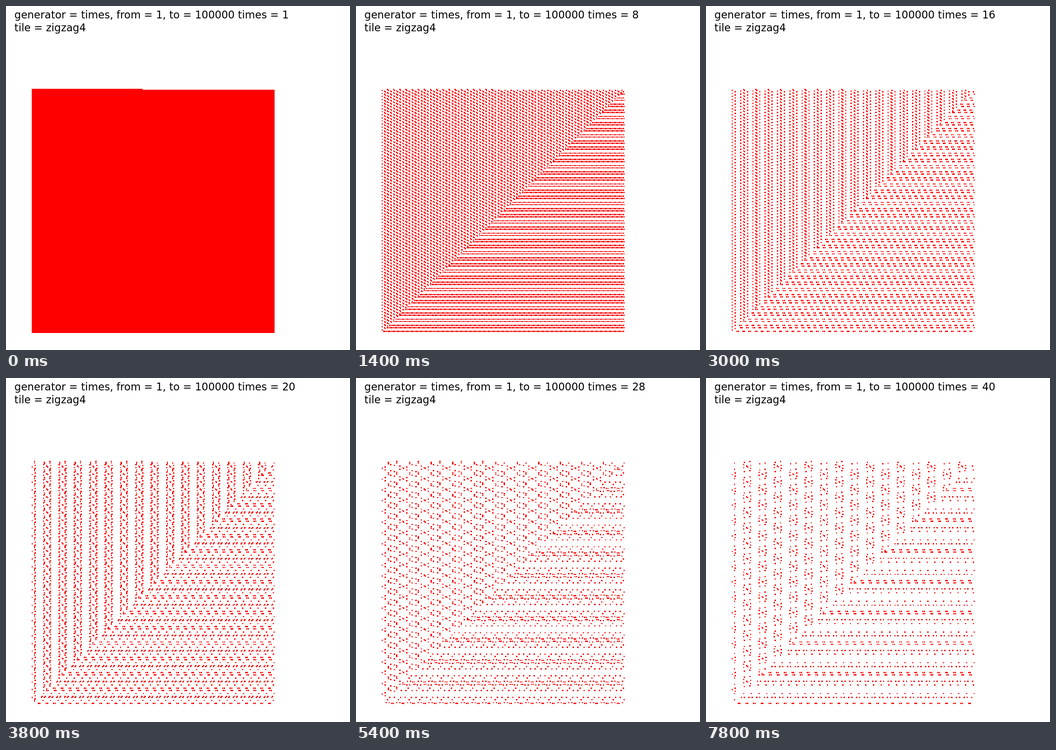
Recreate the animation shown at these times as an HTML page with a canvas. Size 748 by 748 pixels, loop 8000 ms.

```html
<!DOCTYPE html>
<html lang="en">
<head>
<meta charset="utf-8">
<title>Multiples on a zigzag tiling</title>
<style>
  html, body { margin: 0; width: 100%; height: 100%; overflow: hidden; background: #fff; }
  canvas, svg { position: absolute; left: 0; top: 0; width: 748px; height: 748px; }
  text { font: 22.6px "DejaVu Sans", sans-serif; fill: #000; white-space: pre; }
</style>
</head>
<body>
<canvas id="board" width="748" height="748"></canvas>
<svg viewBox="0 0 748 748">
  <text id="label" x="18.3" y="27">generator = times, from = 1, to = 100000 times = 1</text>
  <text x="18.3" y="55">tile = zigzag4</text>
</svg>
<script>
  const LAST = 100000, STEPS = 40, STEP_MS = 200;
  const CELL = 1.67, LEFT = 55.6, BOTTOM = 709.6;
  const ctx = document.getElementById("board").getContext("2d");
  const label = document.getElementById("label");

  const edgeX = col => Math.round(LEFT + col * CELL);
  const edgeY = row => Math.round(BOTTOM - row * CELL);

  // Square shells grow from the bottom left corner; every other one runs backwards.
  function place(number) {
    const shell = Math.ceil(Math.sqrt(number));
    let along = number - (shell - 1) ** 2;
    if (shell % 2 === 0) along = 2 * shell - along;
    return [Math.min(along, shell), Math.min(2 * shell - along, shell)];
  }

  // Cells snap to whole pixels and carry a one pixel outline.
  function drawCell(col, row) {
    const x = edgeX(col - 1), y = edgeY(row);
    ctx.fillRect(x, y, edgeX(col) - x + 1, edgeY(row - 1) - y + 1);
  }

  function draw(factor) {
    ctx.clearRect(0, 0, 748, 748);
    ctx.fillStyle = "#f00";
    for (let number = factor; number <= LAST; number += factor) {
      drawCell(...place(number));
    }
    label.textContent = `generator = times, from = 1, to = ${LAST} times = ${factor}`;
  }

  let shown = 0;
  const start = performance.now();
  function tick() {
    const elapsed = performance.now() - start;
    const factor = Math.floor(elapsed / STEP_MS) % STEPS + 1;
    if (factor !== shown) draw(shown = factor);
    requestAnimationFrame(tick);
  }
  tick();
</script>
</body>
</html>
```
